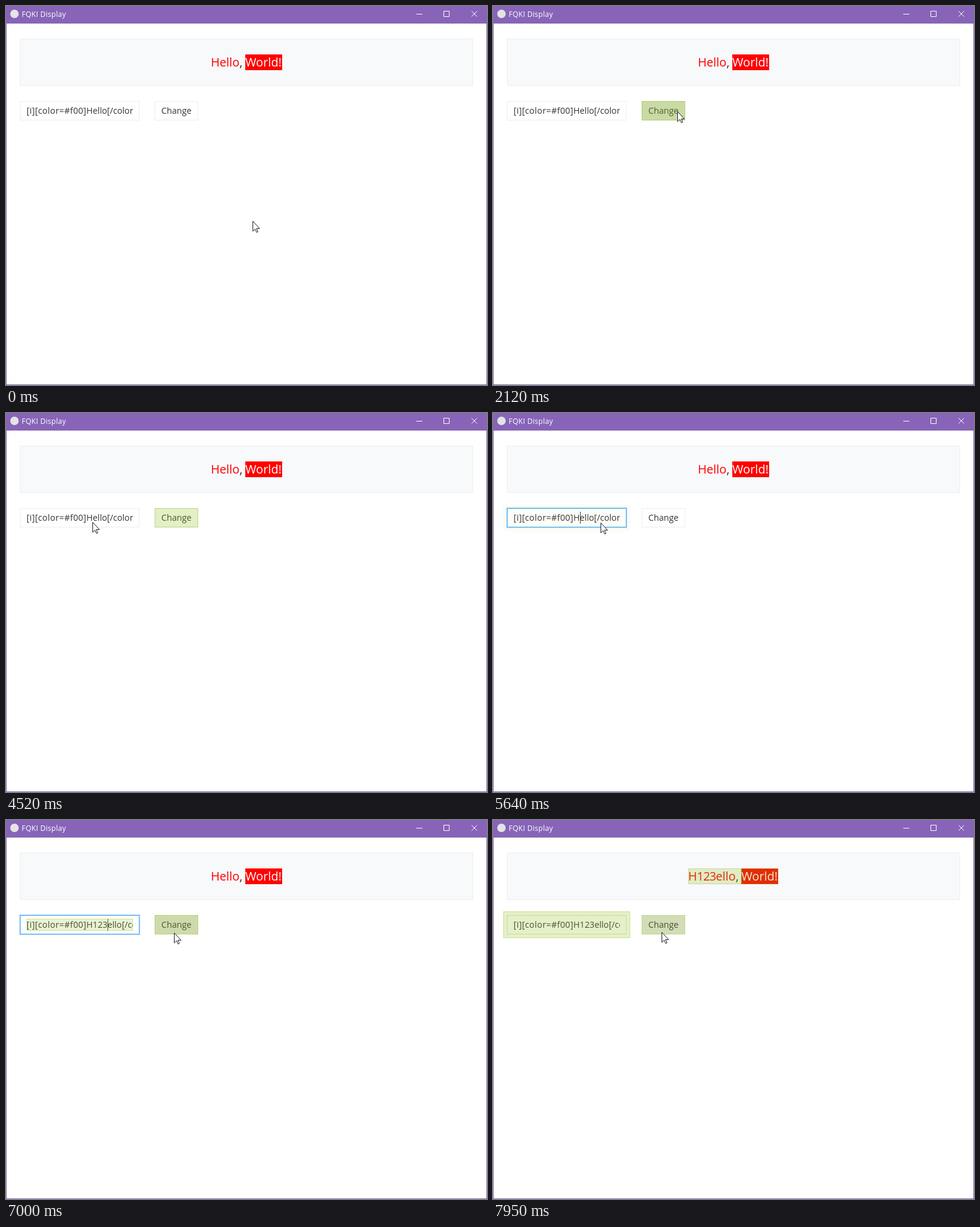
Recreate the animation shown at these times as an HTML page. Size 796 by 626 pixels, loop 8000 ms.

```html
<!DOCTYPE html>
<html>
<head>
<meta charset="utf-8">
<style>
  html, body { margin: 0; width: 100%; height: 100%; overflow: hidden; background: #fff; }
  svg { display: block; font-family: "Open Sans", "Noto Sans", sans-serif; }
  text { white-space: pre; fill: #333; }
  .title { font-size: 12px; letter-spacing: .28px; fill: #fff; }
  .head { font-size: 19.7px; }
  .head .digits { letter-spacing: -.85px; }
  .control { font-size: 14.2px; }
  .markup { letter-spacing: .35px; }
  .flash { fill: #8fbf1b; stroke: #8fbf1b; }
</style>
</head>
<body>
<svg width="796" height="626" viewBox="0 0 796 626">
  <defs><clipPath id="inner"><rect x="33" y="158" width="177" height="30"/></clipPath></defs>

  <rect x=".5" y=".5" width="795" height="625" fill="#fff" stroke="#8764b8"/>
  <rect width="796" height="29" fill="#8764b8"/>
  <circle cx="14" cy="13" r="7" fill="#e4e4e4"/>
  <text class="title" x="26" y="18">FQKI Display</text>
  <path d="M679 13.5h10M724.5 8.5h9v9h-9zM770.5 8.5l9 9m0-9l-9 9" fill="none" stroke="#fff"/>

  <rect x="23.5" y="54.5" width="749" height="77" fill="#f8f9fb" stroke="#ebedef"/>
  <text id="hello" class="head" y="100" fill="red"><tspan fill="red">H<tspan class="digits" id="headDigits"></tspan>ello</tspan>, </text>
  <rect id="worldBox" y="80" width="61" height="26" fill="red"/>
  <text id="world" class="head" y="100" style="fill:#fff">World!</text>

  <rect id="glow" x="22.5" y="156.5" width="199" height="33" fill="none" stroke="#2196f3" stroke-width="3" opacity=".13"/>
  <rect id="input" x="23.5" y="157.5" width="197" height="31" fill="#fff"/>
  <g clip-path="url(#inner)">
    <text class="control" x="34" y="178"><tspan class="markup">[i][color=#f00]</tspan>H<tspan id="typed"></tspan>ello[/color]</text>
  </g>
  <rect id="caret" y="163" width="1" height="20" fill="#2f4a2f"/>

  <rect id="button" x="246.5" y="157.5" width="71" height="31" stroke="#eee"/>
  <text class="control" x="257" y="178">Change</text>

  <g id="flashes"></g>
  <path id="cursor" d="M.5 .5V17l3.7-3.6 2.6 5.5 2.2-1-2.5-5.3h5.2z" fill="#fff" stroke="#1c1c24"/>
</svg>
<script>
const LOOP = 8000, STEP = 80, FADE = 1200;
const FOCUS = 4540, CLICK = 7520;
const KEYS = [6200, 6360, 6520];
const HOVERS = [[2080, 2440], [3600, 4230], [6820, LOOP]];

// time, x, y of the pointer
const PATH = [
  [300, 408, 355], [700, 463, 150], [860, 458, 98], [930, 458, 98],
  [1400, 162, 104], [1800, 334, 102], [2120, 305, 174], [2200, 298, 189],
  [2280, 298, 189], [2760, 150, 181], [2840, 150, 181], [3160, 131, 178],
  [3240, 131, 178], [3400, 190, 174], [3720, 275, 178], [3960, 285, 181],
  [4040, 285, 181], [4280, 255, 222], [4520, 143, 180], [4920, 143, 180],
  [5400, 178, 181], [6520, 178, 181], [6960, 278, 186], [7080, 278, 186],
  [7200, 279, 185]
];

const $ = id => document.getElementById(id);
const set = (id, attrs) => {
  for (const name in attrs) $(id).setAttribute(name, attrs[name]);
};

// Repaint highlights: a box and the times at which it lights up
const flashes = [
  [246, 157, 72, 32, [...HOVERS.flat().filter(t => t < LOOP), CLICK]],
  [17, 151, 210, 44, [FOCUS, CLICK]],
  [23, 157, 198, 32, [CLICK], true],
  [34, 163, 176, 20, KEYS, false, CLICK],
  [323, 80, 88, 26, [CLICK]],
  [411, 80, 61, 26, [CLICK]]
].map(([x, y, w, h, times, outline, end = LOOP]) => {
  const box = document.createElementNS("http://www.w3.org/2000/svg", "rect");
  const attrs = { class: "flash", x: x + .5, y: y + .5, width: w - 1, height: h - 1 };
  for (const name in attrs) box.setAttribute(name, attrs[name]);
  $("flashes").append(box);
  return { box, times, outline, end };
});

function pointerAt(t) {
  const i = PATH.findIndex(p => p[0] > t);
  if (i === 0) return PATH[0].slice(1);
  if (i < 0) return PATH[PATH.length - 1].slice(1);
  const [t0, x0, y0] = PATH[i - 1], [t1, x1, y1] = PATH[i];
  const k = (t - t0) / (t1 - t0);
  return [x0 + (x1 - x0) * k, y0 + (y1 - y0) * k].map(Math.round);
}

const lastBefore = (times, t) => Math.max(-Infinity, ...times.filter(s => s <= t));

function draw(t) {
  const clicked = t >= CLICK, focused = t >= FOCUS && !clicked;
  const hovered = HOVERS.some(([a, b]) => t >= a && t < b);
  const typed = "123".slice(0, KEYS.filter(k => k <= t).length);

  $("headDigits").textContent = clicked ? "123" : "";
  $("typed").textContent = typed;
  set("hello", { x: clicked ? 323 : 339 });
  set("worldBox", { x: clicked ? 411 : 396 });
  set("world", { x: clicked ? 411 : 396 });

  set("input", { stroke: focused ? "#2196f3" : "#eee" });
  set("glow", { visibility: focused ? "visible" : "hidden" });
  set("button", { fill: hovered ? "#e6e6e6" : "#fff" });

  const blinkAge = t - lastBefore([FOCUS, ...KEYS], t);
  const caretOn = focused && blinkAge % 1000 < 500;
  set("caret", { x: 144 + 8 * typed.length, visibility: caretOn ? "visible" : "hidden" });

  for (const { box, times, outline, end } of flashes) {
    const age = t - lastBefore(times, t);
    const alpha = t < end ? Math.max(0, .33 * (1 - age / FADE)) : 0;
    box.setAttribute("fill-opacity", outline ? 0 : alpha);
    box.setAttribute("stroke-opacity", outline ? alpha : Math.min(1, alpha * 1.8));
  }
  set("cursor", { transform: `translate(${pointerAt(t)})` });
}

function tick() {
  const t = performance.now() % LOOP;
  draw(Math.max(0, Math.floor((t - 40) / STEP) * STEP + 40));
  requestAnimationFrame(tick);
}
tick();
</script>
</body>
</html>
```
